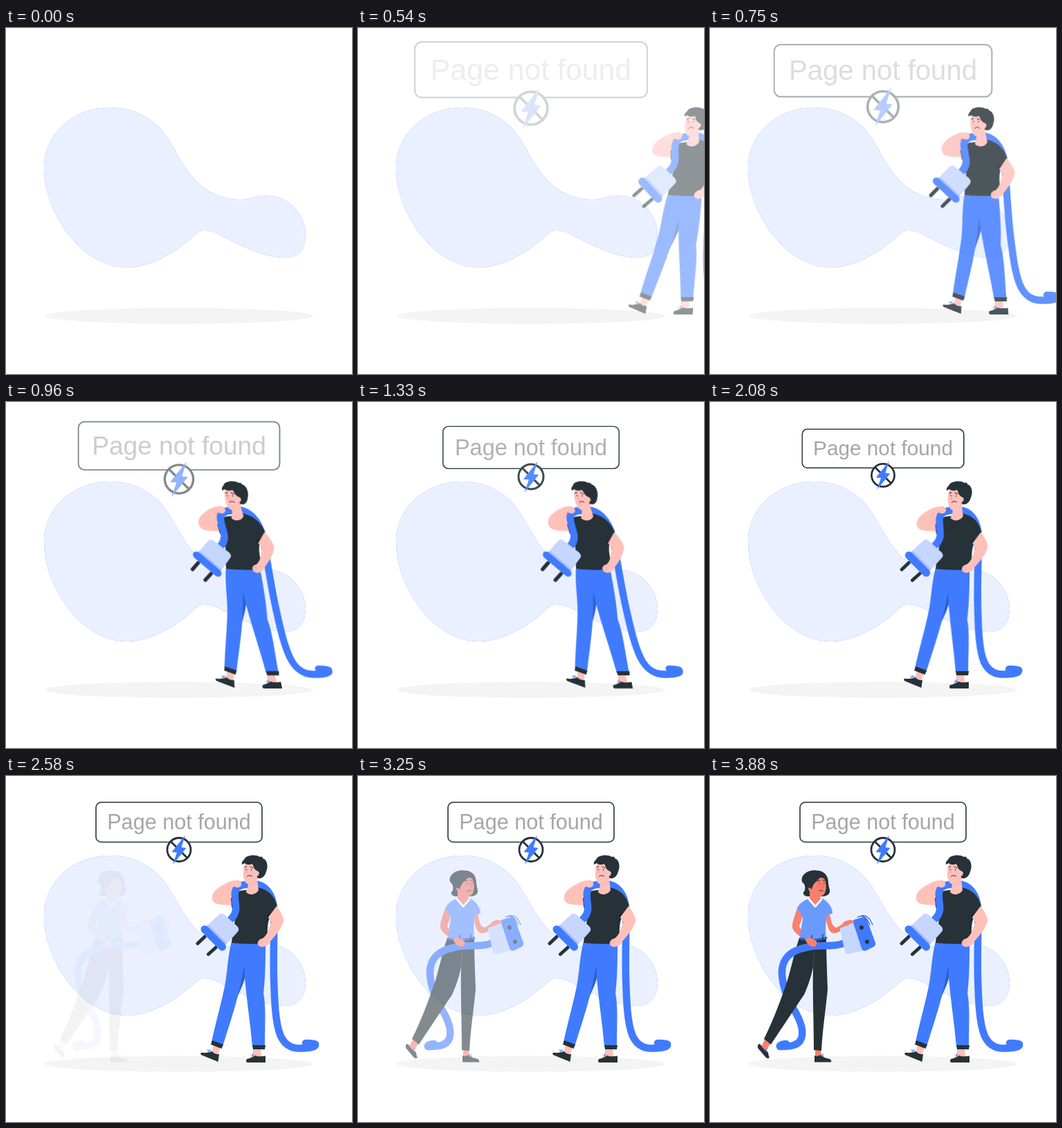
Recreate the animation shown at these times as an HTML page. Size 500x500 px, loop 3.93 s.

```html
<!DOCTYPE html>
<html lang="en">
<head>
<meta charset="utf-8">
<title>Page not found</title>
<style>
  html, body { margin: 0; width: 100%; height: 100%; overflow: hidden; background: #fff; }
  svg { display: block; width: 100%; height: 100%; }

  .dark { fill: #263238; }
  .blue { fill: #407bff; }
  .pale { fill: #c5d6ff; }
  .shade { fill: #2f5fcc; }
  .peach { fill: #ffc0ba; }
  .tan { fill: #f8806f; }
  .line { fill: none; stroke-linecap: round; stroke-linejoin: round; }
  .cable { stroke: #407bff; stroke-width: 10.5; }
  .ink { stroke: #263238; }
  .fine { stroke-width: 1; }

  #sign, #man, #woman {
    animation: 3930ms cubic-bezier(.36, -.01, .5, 1.38) infinite;
    transform-box: view-box;
  }
  #sign { animation-name: zoom; transform-origin: 250px 83px; }
  #man { animation-name: slide; transform-origin: 364px 265px; }
  #woman { animation-name: fade; }

  @keyframes zoom {
    0% { transform: scale(1.5); opacity: 0; }
    58.52%, 100% { transform: scale(1); opacity: 1; }
  }
  @keyframes slide {
    0% { transform: translateX(250px) skewX(-20deg); opacity: 0; }
    35.11% { transform: translateX(0) skewX(10deg); opacity: 1; }
    46.82% { transform: translateX(0) skewX(-2deg); opacity: 1; }
    58.52%, 100% { transform: translateX(0) skewX(0deg); opacity: 1; }
  }
  /* first part of the same easing, cut where it reaches full opacity */
  @keyframes fade {
    0% { opacity: 0; }
    58.52% { opacity: 0; animation-timing-function: cubic-bezier(.395, -.0075, .609, .77); }
    98.52%, 100% { opacity: 1; }
  }
</style>
</head>
<body>
<svg viewBox="0 0 500 500">
  <defs>
    <path id="blob" d="M150 115C190 115 220 135 238 166C257 199 267 218 289 233C304 243 322 248 338 248C353 248 360 242 379 242.5C409 243 433 270 433 299C432 324 420 332 402 332C377 332 345 317 323 306C306 297 297 292 287 292C278 292 274 299 265 306C240 328 205 346 175 346C106 346 55 262 55 204C55 150 100 115 150 115Z"/>
  </defs>
  <use href="#blob" class="blue"/>
  <use href="#blob" fill="#fff" opacity=".89"/>
  <ellipse cx="249.5" cy="416" rx="194" ry="11.5" fill="#f4f4f4"/>

  <g id="sign">
    <rect x="130" y="38" width="240" height="57.5" rx="7.5" fill="#fff" class="ink" stroke-width="1.6"/>
    <text x="250" y="77" text-anchor="middle" font-size="30.6" fill="#a6a6a6" font-family="'Liberation Sans', Arial, sans-serif">Page not found</text>
    <circle cx="250" cy="106.5" r="17" fill="#fff" class="ink" stroke-width="2.8"/>
    <path class="line ink" stroke-width="2.8" d="M238 94.5L262 118.5"/>
    <path class="blue" d="M259 85.5L239.5 110L247 110.5L241 128L260.5 104L253.5 103Z"/>
  </g>

  <g id="woman">
    <path class="line cable" d="M104 280C103 300 112 322 121 337C130 352 136 368 132 379C128 391 112 391 101 391C100 389 105 387 110 387"/>
    <path class="tan" d="M79 381L87 387L81 397L74 391ZM152 395H160L161 406H152Z"/>
    <path class="dark" d="M69 389Q71 386 73 388C76 394 80 396 83 398C85 401 84 404 86 407Q84 409 81 407L69 393ZM151 404Q155 406 160 403C164 407 169 408 173 409Q176 411 175 413.5H151Z"/>
    <path class="line fine" stroke="#407bff" d="M79 397l4-3M80 394l2 5M160 405l4-3M162 402l2 4"/>
    <path class="dark" d="M129 234C121 258 117 279 112 295C104 319 92 352 78 380L88 388C104 364 123 335 136 316C142 303 147 287 149 276C148 312 150 354 150 396L161 397C163 362 168 332 170 308C169 280 168 255 168 233Z"/>
    <path class="line" stroke="#455a64" stroke-width=".8" d="M149 276L151 254"/>
    <path class="dark" d="M133 153C130 142 143 135 154 136.500C167 137 171 146 171 154C171 161 175 166 172 170C168 175 160 174 155 174L143 174C137 174 134 171 135 168C138 165 138 160 136 156Z"/>
    <path class="tan" d="M173 197C174 209 177 218 182 219C190 217 194 209 203 208Q208 208 208 212C203 215 196 216 192 221C186 227 178 229 174 225C169 219 168 207 167 198Z"/>
    <path class="tan" d="M126 191C123 201 118 212 119 219C121 228 134 233 141 239C144 246 151 249 154 244C155 239 150 234 144 234C137 228 131 222 129 217C131 211 133 206 135 199Z"/>
    <path fill="#6a99ff" d="M143 177C136 180 130 183 126 191L134 203C134 213 131 219 130 235C142 238 158 237 168 234C166 220 168 210 169 200L177 199C177 191 173 184 163 177Z"/>
    <path class="line" stroke="#2f5fcc" stroke-width="3" d="M130 235Q149 239 168 234"/>
    <path class="line ink" stroke-width="1.2" d="M147 230V237M163 229V236"/>
    <path class="tan" d="M144 165L158 172L161 179L152 188L144 179Z"/>
    <path class="line" stroke="#fff" stroke-width="2.8" d="M143 178L152 188.500L161 178.500"/>
    <path class="tan" d="M150 150C154 145 163 145 166 150C169 158 168 168 164 172C159 176 151 173 148 168C142 168 140 160 145 158Z"/>
    <path class="dark" d="M138 150C146 139 161 138 168 150C165 147 162 146 159 147C154 153 149 154 147 164C144 160 142 162 140 162Z"/>
    <path class="line ink fine" d="M155 152l4-1M163 151l3 0M158 155v1M165 154.500v1M158 166q3-2 5 0"/>
    <path class="line" stroke="#d95f52" stroke-width=".9" d="M162 155l2 5l-2 1"/>
    <path class="line cable" d="M192 242C181 247 164 244 149 246C133 248 121 252 113 260C106 267 104 274 104 284"/>
    <path class="tan" d="M137 235C143 233 150 234 154 239C155 244 153 247 148 247C142 245 139 240 137 235Z"/>
    <path class="pale" d="M188 222Q187 220 190 219L210 211L223 252L201 257Q197 258 195 254Z"/>
    <path class="blue" d="M207 212Q206 208 210 207L221 204Q226 204 227 208L239 241Q240 245 236 247L226 252Q221 254 219 249Z"/>
    <circle class="dark" cx="219" cy="219" r="3"/>
    <circle class="dark" cx="227" cy="239.500" r="3"/>
    <path class="line" stroke="#2f5fcc" stroke-width="1.2" d="M213 204C222 200 227 205 231 215M218 202C227 200 231 206 235 215"/>
    <path class="tan" d="M192 212C197 208 204 207 208 210Q208 213 204 213L196 217Z"/>
  </g>

  <g id="man">
    <path class="line cable" d="M355 156C376 155 386 173 387 192C388 222 386 258 387 292C388 324 389 358 397 376C405 393 418 394 430 393.500C442 393 448 391 447 387.500C445 386 438 386 433 386"/>
    <path class="peach" d="M300 388L310 391L306 404L297 400ZM357 393H368L369 406H356Z"/>
    <path class="dark" d="M283 399.500C288 401 294 399 298 398C301 402 305 402 308 402L306.500 413L282 403Q280 400 283 399.500ZM348 409C354 408 357 405 360 404C365 406 370 405 375 404.500V414H348Q346 411 348 409Z"/>
    <path class="line fine" stroke="#407bff" d="M292 399l3-4M291 396l6 2M354 405l4-3M356 402l2 4"/>
    <path class="blue" d="M326 239C320 262 320 285 316 304C310 333 302 360 297 385L313 391C321 365 329 341 335 318C340 306 343 299 345 292C348 326 353 358 356 391H374C374 360 376 332 372 314C375 290 375 264 375 239Z"/>
    <path class="shade" d="M344.500 275C341 286 340 300 335 317C340 307 343 300 345 292Z"/>
    <path class="dark" d="M298 382L314 388L311.500 394L296 388ZM356 389H375L374 395H357Z"/>

    <path class="dark" d="M346 165C338 165 329 168 325 177L326 190L332 192C332 210 327 225 326 241C340 243 360 243 378 242C378 226 377 214 381 205L392 188C388 173 379 164 364 161Z"/>
    <path fill="#1b2529" d="M391 187L380 206L376 201C383 199 388 193 391 187Z"/>
    <path class="peach" d="M337 151C326 149 311 157 302 166C296 173 297 181 303 184C310 187 319 186 325 187V175C328 169 333 165 339 162Z"/>
    <path class="peach" d="M391 188C396 195 401 203 401 209C400 219 388 232 382 239C378 246 370 249 365 245C362 240 365 236 371 234.500C378 230 380 220 383 211L379 204Z"/>
    <path class="line" stroke="#e89a94" stroke-width=".8" d="M365 240l5-2M367 243l4-2"/>

    <path class="line cable" d="M352 157C341 156 332 160 331 168C330 178 333 186 332 194C331 201 327 206 321 211"/>
    <path class="peach" d="M350 149H363L365 165C361 172 352 173 347 168C348 163 351 160 350 149Z"/>
    <path class="peach" d="M328 152C334 150 340 151 340 155C341 159 337 162 333 161L327 159Z"/>

    <path class="line ink" stroke-width="5" d="M287 232.500L277 242M303 248L292.500 257.500"/>
    <path class="pale" d="M289 218L307 201Q311 197 315 200L334 217Q338 221 335 225L316 246Z"/>
    <path class="line" stroke="#9dbaff" stroke-width="3" d="M292 217L317 242"/>
    <path class="line" stroke="#407bff" stroke-width="11" d="M287 221.500L312.500 247"/>

    <path class="peach" d="M345 126C342 136 342 146 345 152C348 158 355 157 359 154C363 151 366 147 366 140L364 126Z"/>
    <path class="dark" d="M341 128C340 123 344 122 345 119C349 114 361 113 367 117C369 116 371 117 371 119C378 121 379 131 376 138C374 146 368 150 363 147C362 144 365 141 363 137C359 136 358 131 356 127C352 129 347 128 345 126Z"/>
    <path class="peach" d="M361 138C365 136 367 140 365 143C364 145 361 145 361 143Z"/>
    <path class="line ink fine" d="M345 132l3-1.500M353 131l4 2M347 134.500v1.200M354.500 135v1.200M348.500 145q4-3 7 0"/>
    <path class="line" stroke="#e89a94" stroke-width=".9" d="M349 135l-2 5l2 1"/>
  </g>
</svg>
</body>
</html>
```
